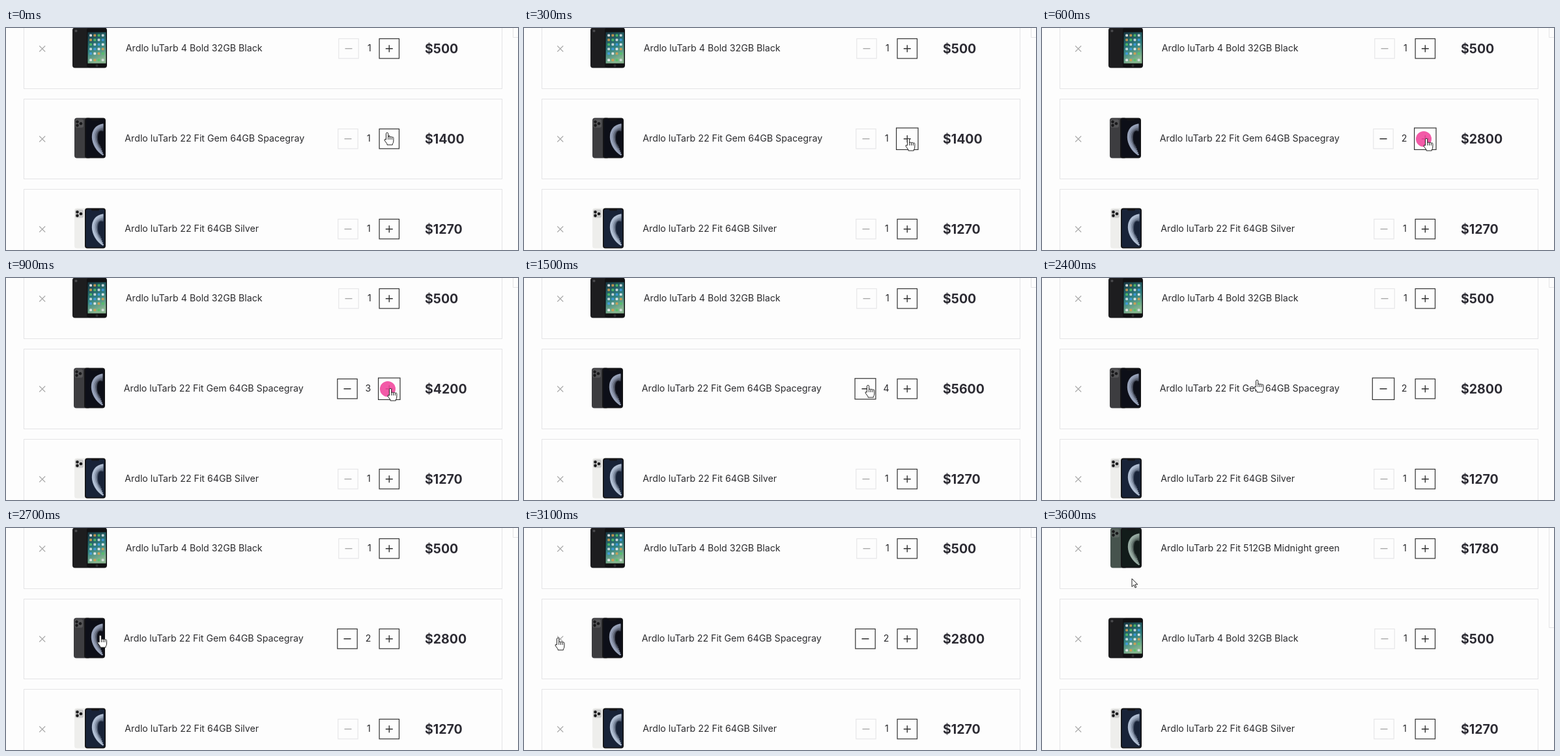
Recreate the animation shown at these times as an HTML page. Size 786 by 342 pixels, loop 3700 ms.

```html
<!DOCTYPE html>
<html lang="en">
<head>
<meta charset="utf-8">
<title>Cart</title>
<style>
  html, body { margin: 0; width: 100%; height: 100%; overflow: hidden; background: #fdfdfd; }
  svg { display: block; }
  text { font: 14.2px Inter, sans-serif; fill: #2b2b2e; }
  .price { font-size: 19.5px; font-weight: 700; fill: #2c2b33; }
  .count { text-anchor: middle; }
  .frame { fill: none; stroke: #e4e4e6; }
</style>
</head>
<body>
<svg width="786" height="342" viewBox="0 0 786 342">
  <defs>
    <linearGradient id="home" x2=".3" y2="1">
      <stop stop-color="#16343f"/><stop offset=".55" stop-color="#2f7f80"/><stop offset="1" stop-color="#86b58f"/>
    </linearGradient>
  </defs>
  <g id="scene"></g>
</svg>
<script>
const LOOP = 3700, STEP = 100, HOLD = 180, REMOVED = 3500;
const scene = document.getElementById('scene');

const start = { x: 588, y: 170 };
const moves = [
  { from: 0, to: 300, x: 593, y: 179 },
  { from: 1200, to: 1500, x: 531, y: 174 },
  { from: 2100, to: 2400, x: 333, y: 166 },
  { from: 2400, to: 2850, x: 55, y: 178 },
  { from: 3400, to: 3600, x: 142, y: 85 }
];
const plusClicks = [500, 800, 1100], minusClicks = [1510, 1610], closeClicks = [3400];
const clicks = [...plusClicks, ...minusClicks, ...closeClicks];

const items = {
  old: { name: 'Ardlo luTarb 4 Bold 32GB Black', price: 500, old: true },
  gray: { name: 'Ardlo luTarb 22 Fit Gem 64GB Spacegray', price: 1400, back: '#3d3d40', sky: '#0d0f18', glow: '#a3aec6' },
  silver: { name: 'Ardlo luTarb 22 Fit 64GB Silver', price: 1270, back: '#eeeeec', sky: '#182338', glow: '#bccbe0' },
  green: { name: 'Ardlo luTarb 22 Fit 512GB Midnight green', price: 1780, back: '#46534d', sky: '#121c1a', glow: '#a3b8ae' }
};

const ramp = (t, from, to) => Math.max(0, Math.min(1, (t - from) / (to - from)));
const done = (times, t) => times.filter(c => c <= t).length;
const repeat = (n, draw) => Array.from({ length: n }, (_, i) => draw(i)).join('');
const rect = (x, y, w, h, fill, r = 0) =>
  `<rect x="${x}" y="${y}" width="${w}" height="${h}" rx="${r}" fill="${fill}"/>`;
const circle = (x, y, r, fill) => `<circle cx="${x}" cy="${y}" r="${r}" fill="${fill}"/>`;
const label = (x, y, str, cls = '') => `<text x="${x}" y="${y}" class="${cls}">${str}</text>`;
const at = (x, y, content) => `<g transform="translate(${x} ${y})">${content}</g>`;

const pointerAt = t => moves.reduce((p, m) => {
  const k = ramp(t, m.from, m.to);
  return { x: p.x + (m.x - p.x) * k, y: p.y + (m.y - p.y) * k };
}, start);

// Phones are drawn around their own centre
function oldPhone() {
  const colors = ['#f4f4f4', '#54c568', '#3f9ee8', '#d8a050', '#dfe6e8'];
  const icons = repeat(24, i => {
    const line = i >> 2;
    return rect(-0.3 + (i % 4) * 6.2, -21 + line * 7 + (line > 4 ? 3 : 0), 3.8, 3.8, colors[(i * 3 + line) % 5], 1);
  });
  return rect(-26.5, -31, 27, 62, '#1d1d1f', 4) + circle(-21, -26, 2, '#48484b') +
    rect(-4.5, -31, 31, 62, '#111113', 4) + rect(-3, -24, 28, 48, 'url(#home)') +
    `<g opacity=".85">${icons}</g>` + circle(11, 27.5, 2, '#2c2c2e');
}

function newPhone({ back, sky, glow }) {
  const lenses = repeat(3, i => circle(i === 1 ? -13.5 : -19, -25 + i * 2.8, 2.3, '#19191b'));
  const planet = repeat(6, i =>
    `<path d="M21 ${2 * i - 21}C${2 * i - 2}-18 ${2 * i} 13 ${21 - i} ${26 - 3 * i}" opacity="${0.9 - i * 0.13}"/>`);
  return rect(-23.5, -31, 26, 62, back, 4) + rect(-22.5, -29, 13, 13, '#8885', 3) + lenses +
    rect(-7.5, -31, 32, 62, '#151517', 4) + rect(-5.7, -29.2, 28.4, 58.4, sky, 3) +
    `<g fill="none" stroke="${glow}" stroke-width="2.4">${planet}</g>` +
    rect(2.5, -30, 12, 3, '#151517', 1.5);
}

function button(x, y, plus, ink, border, grow = 0) {
  const half = 15.2 + 1.5 * grow, size = 2 * half;
  return at(x, y,
    `<rect x="${-half}" y="${-half}" width="${size}" height="${size}" fill="none" stroke="${border}" stroke-width="1.2"/>` +
    `<path d="M-5.5 0H5.5${plus ? 'M0-5.5V5.5' : ''}" stroke="${ink}" stroke-width="1.4"/>`);
}

function row(y, item, { count = 1, minusDark = false, minusGrow = 0, plusGrow = 0 } = {}) {
  const many = count > 1;
  // Columns shift a little with the widths of picture and price
  const shift = item.old ? 1 : many ? -1 : 0;
  return `<rect x="27.5" y="${y - 61.5}" width="734" height="123" class="frame"/>` +
    at(55.7, y, '<path d="M-4.5-4.5L4.5 4.5M4.5-4.5L-4.5 4.5" stroke="#aaa" stroke-width="1.1"/>') +
    at(128.5 + Math.min(0, shift), y - 1.5, item.old ? oldPhone() : newPhone(item)) +
    label(182.3 + 1.5 * shift, y + 4.2, item.name) +
    button(525 + shift, y - 0.3, false, many ? '#222' : '#aaa', minusDark ? '#333' : '#e6e6e8', minusGrow) +
    label(557 + shift, y + 4.4, count, 'count') +
    button(588.3, y - 0.3, true, '#333', '#333', plusGrow) +
    label(643, y + 6.9, '$' + item.price * count, 'price');
}

const hand = `<path d="M-4.5 2V-7.2a1.6 1.6 0 0 1 3.2 0V-2a1.5 1.5 0 0 1 2.8 0a1.5 1.5 0 0 1 2.8 .6a1.4 1.4 0 0 1 2.6 .8V4Q6.9 7 5.4 8.5V10H-3V8.5L-7 3Q-7.5 .5-4.5 2z
  M-1.3-2V2M1.5-2V2M4.3-1.4V2" fill="#fff" stroke="#222" stroke-linejoin="round"/>`;
const arrow = '<path d="M-4-7V5.5l3-2.8 2 4.3 1.8-.8-2-4.2h4z" fill="#fff" stroke="#222"/>';

function render(t) {
  const removed = t >= REMOVED;
  const { x, y } = pointerAt(t);
  const state = {
    count: 1 + done(plusClicks, t) - done(minusClicks, t),
    minusDark: t > plusClicks[0] + HOLD,
    plusGrow: ramp(t, 0, 300) - ramp(t, 1200, 1500),
    minusGrow: ramp(t, 1400, 1600) - ramp(t, 2400, 2600)
  };
  const pressed = !removed && clicks.some(c => t >= c && t < c + HOLD);
  scene.innerHTML =
    row(32, removed ? items.green : items.old) +
    (removed ? row(171, items.old) : row(171, items.gray, state)) +
    row(310, items.silver) +
    `<path d="M778.5 0V${removed ? 153.5 : 14.5}H786" class="frame"/>` +
    (pressed ? `<g opacity=".88">${circle(x - 7, y - 8, 12, '#f0439b')}</g>` : '') +
    at(x, y, removed ? arrow : hand);
}

let shown = -1;
function tick() {
  const t = Math.floor(performance.now() % LOOP / STEP) * STEP;
  if (t !== shown) render(shown = t);
  requestAnimationFrame(tick);
}
tick();
</script>
</body>
</html>
```
